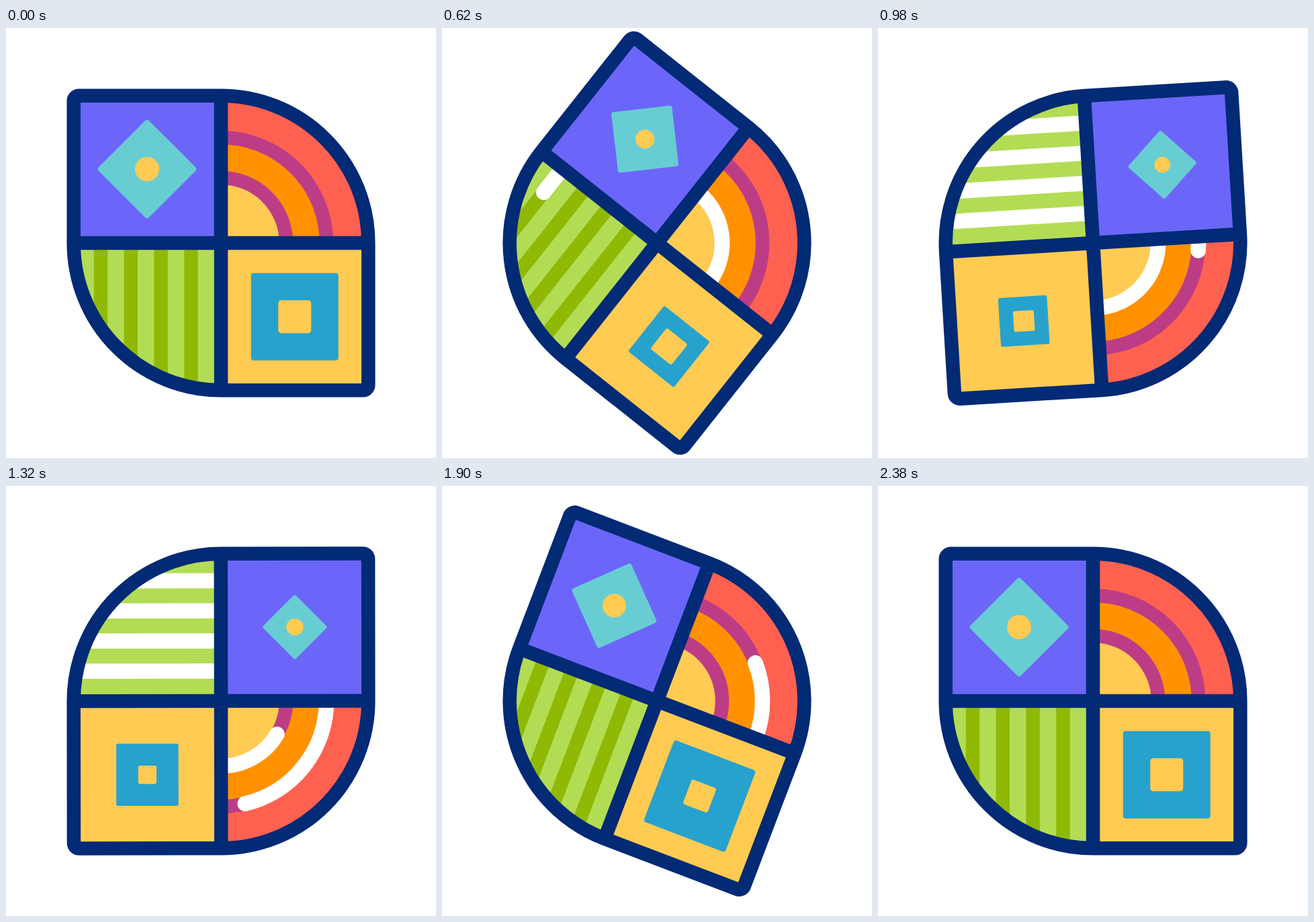
An HTML page for the animation above (2400 ms loop, 640 px wide and 640 px high).

```html
<!DOCTYPE html>
<html>
<head>
<meta charset="utf-8">
<title>Turning tiles</title>
<style>
html, body { margin: 0; height: 100%; overflow: hidden; background: #fff; }
svg { display: block; width: 100%; height: 100%; }
</style>
</head>
<body>
<svg viewBox="-320 -320 640 640">
  <defs>
    <path id="leaf" d="M-219.3 0V-211.3a8 8 0 0 1 8-8H0A219.3 219.3 0 0 1 219.3 0V211.3a8 8 0 0 1-8 8H0A219.3 219.3 0 0 1-219.3 0Z"/>
    <clipPath id="inside"><use href="#leaf"/></clipPath>
  </defs>
  <g id="tile">
    <g clip-path="url(#inside)">
      <path fill="#ff6150" d="M0-220H220V0H0Z"/>
      <circle r="157" fill="#ff9100"/>
      <circle r="97" fill="#ffcb52"/>
      <path fill="#b3dc55" d="M-220 0H0V220H-220Z"/>
      <g id="lines" fill="none"></g>
      <path fill="#6b66f9" d="M-220-220H0V0H-220Z"/>
      <path fill="#ffcb52" d="M0 0H220V220H0Z"/>
    </g>
    <g fill="none" stroke="#022a75" stroke-width="20.5">
      <use href="#leaf"/>
      <path d="M0-219V219M-219 0H219"/>
    </g>
    <rect id="diamond" x="-53" y="-53" width="106" height="106" rx="4" fill="#68cdd3"/>
    <circle id="dot" r="18" fill="#ffcb52"/>
    <rect id="frame" x="-65" y="-65" width="130" height="130" rx="4" fill="#27a2cd"/>
    <rect id="core" x="-24.5" y="-24.5" width="49" height="49" rx="4.5" fill="#ffcb52"/>
  </g>
</svg>
<script>
const LOOP = 2400;
const byId = id => document.getElementById(id);
const progress = (t, start, end) => Math.min(1, Math.max(0, (t - start) / (end - start)));
const smooth = x => x * x * (3 - 2 * x);
const ease = (t, start, end) => smooth(progress(t, start, end));

// cubic-bezier(.8, 0, .2, 1), solved by bisection
function swing(x) {
  let lo = 0, hi = 1;
  for (let i = 0; i < 24; i++) {
    const u = (lo + hi) / 2, v = 1 - u;
    if (2.4 * u * v * v + 0.6 * u * u * v + u * u * u < x) lo = u; else hi = u;
  }
  return smooth(lo);
}

function addLine(d, color, width) {
  const path = document.createElementNS('http://www.w3.org/2000/svg', 'path');
  path.setAttribute('d', d);
  path.setAttribute('stroke', color);
  path.setAttribute('stroke-width', width);
  byId('lines').append(path);
  return path;
}

// A coloured line with a white one that is drawn along it, then wiped away
const sweeps = [];
function addSweep(d, color, head, tail) {
  addLine(d, color, 20.5);
  const white = addLine(d, '#fff', 22.6);
  white.setAttribute('pathLength', 1);
  white.setAttribute('stroke-linecap', 'round');
  sweeps.push({ white, head, tail });
}

const arc = r => `M0 ${-r}A${r} ${r} 0 0 1 ${r} 0`;
addSweep(arc(97), '#bc3d86', [10, 595], [1091, 1677]);
addSweep(arc(157), '#bc3d86', [876, 1462], [1661, 2121]);
for (let i = 0; i < 4; i++) {
  const x = -179 + 44.8 * i, head = 568 + 92 * i, tail = 1325 + 120 * i;
  addSweep(`M${x} 0V${Math.sqrt(219 * 219 - x * x)}`, '#90b906',
    [head, head + 130], [tail, tail + 130]);
}

// id, centre, smallest scale, shrink start and end, grow start and end, turn
const pulses = [
  ['diamond', -110, 0.645, 160, 1215, 1265, 2205, 45],
  ['dot', -110, 0.65, 0, 1080, 1080, 2060, 0],
  ['frame', 109.7, 0.555, 0, 925, 925, 1915, 0],
  ['core', 109.7, 0.555, 45, 1320, 1350, 2380, 0],
];

function draw(t) {
  const turn = 90 * (swing(progress(t, 10, 1270)) - swing(progress(t, 1283, 2358)));
  byId('tile').setAttribute('transform', `rotate(${turn})`);

  for (const [id, pos, min, s0, s1, g0, g1, angle] of pulses) {
    const scale = 1 - (1 - min) * (ease(t, s0, s1) - ease(t, g0, g1));
    byId(id).setAttribute('transform',
      `translate(${pos} ${pos}) rotate(${angle}) scale(${scale})`);
  }

  for (const { white, head, tail } of sweeps) {
    const to = ease(t, ...head), from = ease(t, ...tail);
    white.style.visibility = to > from ? 'visible' : 'hidden';
    white.setAttribute('stroke-dasharray', `${to - from} 2`);
    white.setAttribute('stroke-dashoffset', -from);
  }
}

const begin = performance.now();
function tick() {
  draw((performance.now() - begin) % LOOP);
  requestAnimationFrame(tick);
}
tick();
</script>
</body>
</html>
```
